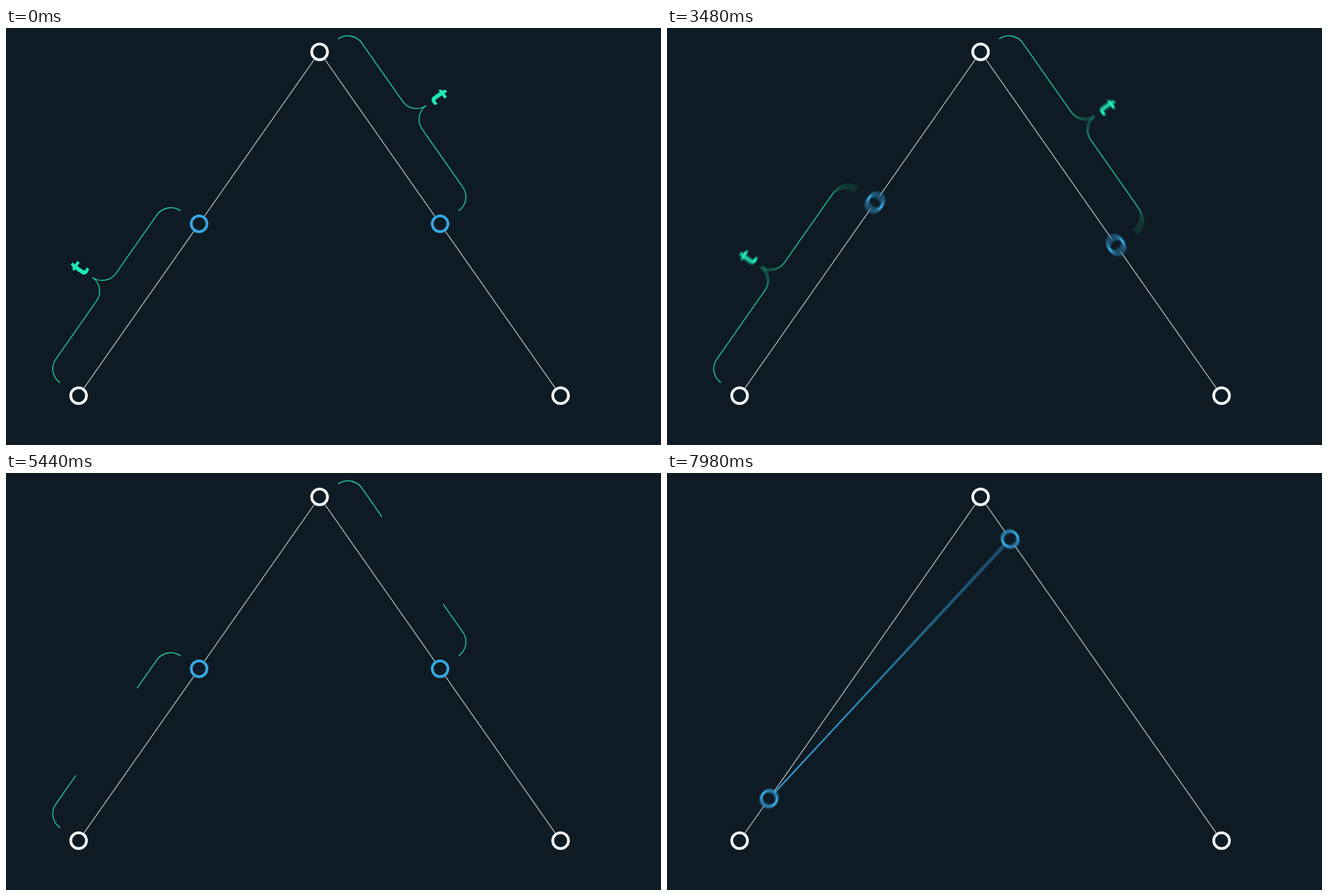
These frames come from a looping animation (848x541 px, 8 s). An HTML page with a canvas:

```html
<!DOCTYPE html>
<html lang="en">
<head>
<meta charset="utf-8">
<title>Interpolating along two segments</title>
<style>
  html, body { margin: 0; width: 100%; height: 100%; overflow: hidden; background: #0f1b24; }
  canvas { display: block; }
</style>
</head>
<body>
<canvas id="stage" width="848" height="541"></canvas>
<script>
const LOOP = 8000;
const SHUTTER = 12, SAMPLES = 8; // motion blur window in ms
const BG = '#0f1b24', WHITE = '#f5f9fc', EDGE = '#c3cdd4';
const BLUE = '#37a8e2', GREEN = '#22c79f', LETTER = '#1fe8b4';

const start = { x: 94, y: 477 }, apex = { x: 406, y: 31 }, end = { x: 718, y: 477 };
const segments = [[start, apex], [apex, end]];
const segmentLength = Math.hypot(apex.x - start.x, apex.y - start.y);

const screen = document.getElementById('stage').getContext('2d');
const buffer = document.createElement('canvas');
buffer.width = 848;
buffer.height = 541;
const ctx = buffer.getContext('2d');

const clamp = v => Math.min(1, Math.max(0, v));
const ease = u => u < 0.5 ? 2 * u * u : 1 - 2 * (1 - u) ** 2;
const progress = (time, from, to) => clamp((time - from) / (to - from));
const mix = (a, b, u) => ({ x: a.x + (b.x - a.x) * u, y: a.y + (b.y - a.y) * u });

// Each move: start time, end time, change of the parameter t
const moves = [
  [2130, 2912, 0.5], [2912, 4128, -1], [4250, 5050, 0.5],
  [6266, 7066, 0.5], [7066, 8282, -1]
];
const parameterAt = time =>
  moves.reduce((t, [from, to, delta]) => t + delta * ease(progress(time, from, to)), 0.5);

function line(a, b, color, width) {
  ctx.strokeStyle = color;
  ctx.lineWidth = width;
  ctx.beginPath();
  ctx.moveTo(a.x, a.y);
  ctx.lineTo(b.x, b.y);
  ctx.stroke();
}

function ring({ x, y }, color) {
  ctx.beginPath();
  ctx.arc(x, y, 10.2, 0, 2 * Math.PI);
  ctx.fillStyle = BG;
  ctx.fill();
  ctx.strokeStyle = color;
  ctx.lineWidth = 3.5;
  ctx.stroke();
}

// Curly brace along a segment, erased from its middle as reveal falls to 0
function brace([a, b], t, reveal, letterAlpha) {
  const r = 22, foot = -29.4, bar = foot - r, tip = bar - r;
  const length = segmentLength * t, mid = length / 2;
  const visibility = clamp((t - 0.165) / 0.015);
  if (!visibility) return;

  ctx.save();
  ctx.translate(a.x, a.y);
  ctx.rotate(Math.atan2(b.y - a.y, b.x - a.x));
  ctx.globalAlpha = visibility;
  if (reveal > 0) {
    const total = 2 * Math.PI * r + length - 4 * r;
    const part = total / 2 * reveal;
    if (reveal < 1) ctx.setLineDash([part, total - 2 * part, part, total]);
    ctx.strokeStyle = GREEN;
    ctx.lineWidth = 1.3;
    ctx.beginPath();
    ctx.moveTo(0, foot);
    ctx.arcTo(0, bar, r, bar, r);
    ctx.lineTo(mid - r, bar);
    ctx.arcTo(mid, bar, mid, tip, r);
    ctx.lineTo(mid, tip);
    ctx.arcTo(mid, bar, mid + r, bar, r);
    ctx.lineTo(length - r, bar);
    ctx.arcTo(length, bar, length, foot, r);
    ctx.stroke();
  }
  ctx.globalAlpha *= letterAlpha;
  ctx.fillStyle = LETTER;
  ctx.font = 'bold 35px "Open Sans", sans-serif';
  ctx.textAlign = 'center';
  ctx.fillText('t', mid, -82.5);
  ctx.restore();
}

function drawScene(time) {
  const t = parameterAt(time);
  const dots = segments.map(([a, b]) => mix(a, b, t));
  const reveal = 1 - ease(progress(time, 5250, 5630));
  const letterAlpha = 1 - progress(time, 5150, 5300);
  const link = ease(progress(time, 5950, 6270));

  ctx.fillStyle = BG;
  ctx.fillRect(0, 0, 848, 541);
  segments.forEach(([a, b]) => line(a, b, EDGE, 1.15));
  if (link > 0) line(dots[0], mix(dots[0], dots[1], link), BLUE, 1.8);
  segments.forEach(segment => brace(segment, t, reveal, letterAlpha));
  dots.forEach(dot => ring(dot, BLUE));
  [start, apex, end].forEach(point => ring(point, WHITE));
}

function render(now) {
  const time = now % LOOP;
  const moving = moves.some(([from, to]) => time > from - SHUTTER && time < to + SHUTTER);
  const samples = moving ? SAMPLES : 1;
  for (let i = 0; i < samples; i++) {
    drawScene(time + SHUTTER * ((i + 0.5) / samples - 0.5));
    screen.globalAlpha = 1 / (i + 1); // running average of the samples
    screen.drawImage(buffer, 0, 0);
  }
  requestAnimationFrame(render);
}
requestAnimationFrame(render);
</script>
</body>
</html>
```
